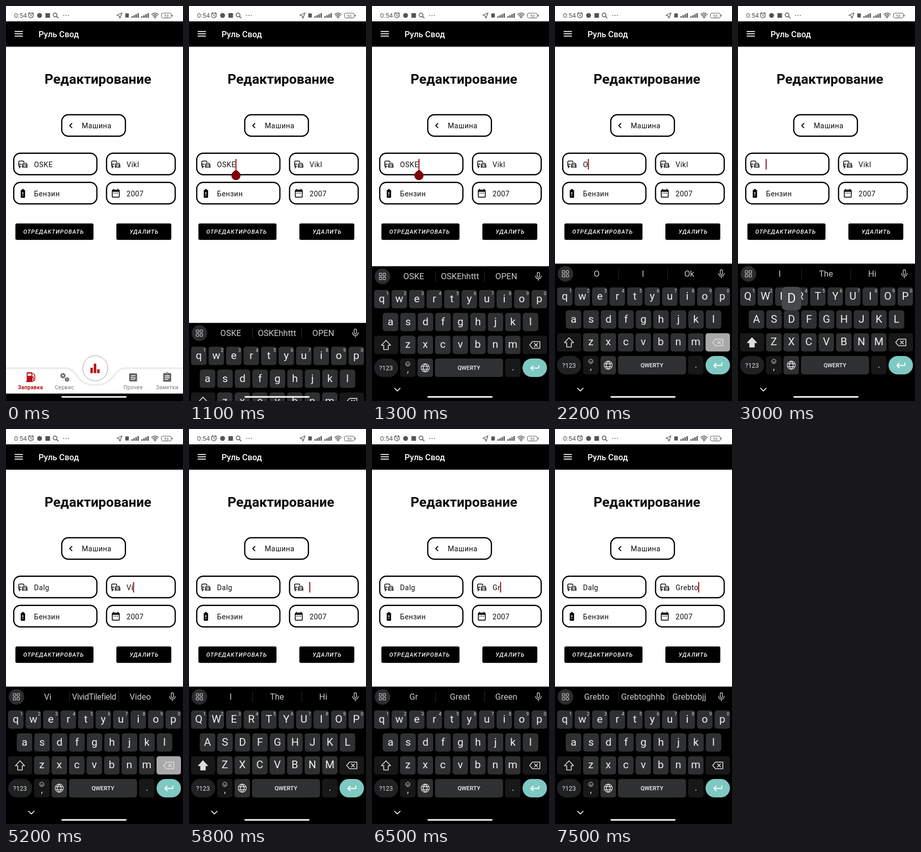
Write an HTML page that moves like this. It is 348 by 772 pixels and loops after 8000 ms.

```html
<!DOCTYPE html>
<html lang="ru">
<head>
<meta charset="utf-8">
<style>
html, body { margin: 0; height: 100%; overflow: hidden; background: #fff; }
svg { display: block; width: 100vw; height: 100vh; font-family: Roboto, "Noto Sans", sans-serif; }
.mid { text-anchor: middle; }
.line { fill: none; stroke: currentColor; stroke-width: 1.4; stroke-linecap: round; stroke-linejoin: round; }
.box { fill: #fff; stroke: #000; stroke-width: 2.4; }
.field { font-size: 14.2px; letter-spacing: .44px; fill: #111; }
.btn { font: italic 500 11px Roboto, "Noto Sans", sans-serif; letter-spacing: 1.1px; fill: #fff; }
.tab { font-size: 10.5px; letter-spacing: .3px; fill: #757575; text-anchor: middle; }
.letter { font-size: 21px; fill: #f0f0f0; text-anchor: middle; }
.digit { font-size: 9px; fill: #dcdcdc; text-anchor: middle; }
.hint { font-size: 16.5px; fill: #c9cbcd; text-anchor: middle; }
.caps .letter { text-transform: uppercase; }
.caps #shift { fill: #ddd; }
</style>
</head>
<body>
<svg id="stage" viewBox="0 0 348 772" preserveAspectRatio="none"></svg>
<script>
const rect = (x, y, w, h, r, fill, extra = '') =>
  `<rect x="${x}" y="${y}" width="${w}" height="${h}" rx="${r}" fill="${fill}" ${extra}/>`;
const text = (x, y, cls, label, extra = '') =>
  `<text x="${x}" y="${y}" class="${cls}" ${extra}>${label}</text>`;
const circle = (x, y, r, fill, extra = '') =>
  `<circle cx="${x}" cy="${y}" r="${r}" fill="${fill}" ${extra}/>`;
const line = (d, color, width = 1.4) =>
  `<path class="line" d="${d}" style="color:${color};stroke-width:${width}"/>`;
const at = (x, y, scale, body) => `<g transform="translate(${x} ${y}) scale(${scale})">${body}</g>`;
const frame = (x, y, w) => `<rect class="box" x="${x}" y="${y}" width="${w}" height="42" rx="13"/>`;

// Icons on a 24-unit grid
const commute =
  line('M7.5 17H5Q3 17 3 15V7Q3 5 5 5H12Q14 5 14 7V7.5M3 12H8.5M5 18L4 20', '#111', 1.8) +
  line('M11 19V14L12.5 10H19.5L21 14V19M11 13.5H21M11 18H21', '#111', 1.6) +
  circle(5.2, 14.8, 1, '#111') + circle(13, 15.8, 1, '#111') + circle(19, 15.8, 1, '#111');
const battery = rect(7, 4, 10, 18, 1.4, '#000') + rect(10, 2, 4, 3, 0, '#000') +
  rect(11, 9, 2, 5, 0, '#fff') + rect(11, 16, 2, 2, 0, '#fff');
const calendar = rect(3, 4, 18, 18, 2, '#111') + rect(5, 9, 14, 11, 0, '#fff') +
  rect(6, 2, 2, 3, 0, '#111') + rect(16, 2, 2, 3, 0, '#111') +
  [7, 11, 15].map(x => rect(x, 11, 2, 2, 0, '#111')).join('');
const pump = rect(4, 2, 12, 20, 1.5, '#b80f14') + rect(6, 4.5, 8, 5, .5, '#fff') +
  rect(2.5, 20.5, 15, 2, 0, '#b80f14') +
  line('M16 12H18V18Q18 19.5 19.5 19.5T21 18V8L17.5 4.5', '#b80f14', 1.7);
const gear = (x, y, r) => circle(x, y, r, 'none', 'stroke="#666" stroke-width="2.6"') +
  circle(x, y, r + 1.6, 'none',
    `stroke="#666" stroke-width="2" pathLength="16" stroke-dasharray="1 1"`);
const note = rect(3, 3, 18, 18, 2, '#616161') + line('M8 8H17M7 12H14M7 16H11M17 13L13 17', '#fff', 1.8);
const clipboard = rect(3, 3, 18, 19, 2, '#616161') + circle(12, 3.5, 2.6, '#616161') +
  circle(12, 4, 1, '#fff') + line('M7 9H17M7 13H17M7 17H14', '#fff', 1.9);

function statusBar() {
  const ink = '#555';
  const bars = x => [3, 5, 7, 9].map((h, i) => rect(x + i * 4, 23 - h, 2.7, h, .5, ink)).join('');
  return text(16, 23, '', '0:54', `font-size="13" fill="${ink}"`) +
    circle(49, 18.5, 4.6, 'none', `stroke="${ink}" stroke-width="1.4"`) +
    line('M49 16V19L51 20M44 15L46.5 12.8M54 15L51.5 12.8', ink, 1.3) +
    circle(66, 18.5, 4.8, ink) + rect(77.5, 14, 9, 9, 0, ink) +
    circle(96.5, 17.5, 3.7, 'none', `stroke="${ink}" stroke-width="1.5"`) +
    line('M99.5 20.5L102.5 23.5', ink, 1.7) +
    [113.5, 118, 122.5].map(x => circle(x, 18.5, 1, ink)).join('') +
    line('M218 18L228 13.5L224 24L222.5 19.5Z', ink, 1.3) +
    rect(234.5, 14.5, 7, 8, 0, ink) + bars(246.5) + bars(266) +
    line('M286.5 16.5Q293 11 299.5 16.5M288.5 19Q293 15.2 297.5 19M290.7 21.2Q293 19.4 295.3 21.2', ink, 1.5) +
    circle(293, 23, 1.2, ink) +
    rect(305.5, 14, 19.5, 9.5, 3, 'none', `stroke="${ink}"`) + rect(326, 17, 1.5, 3.5, .7, ink) +
    text(315.3, 21.6, 'mid', '53', `font-size="8" fill="${ink}"`);
}

function page() {
  return rect(0, 0, 348, 772, 0, '#fff') + statusBar() +
    rect(0, 79, 348, 3, 0, '#f1f1f1') + rect(0, 30, 348, 49.5, 0, '#000') +
    [49.8, 54.3, 58.8].map(y => rect(17, y - .9, 16.2, 1.8, 0, '#fff')).join('') +
    text(64, 61, '', 'Руль Свод', 'font-size="16.3" font-weight="500" fill="#fff"') +
    text(180.7, 152, 'mid', 'Редактирование', 'font-size="26.6" font-weight="700" fill="#0a0a0a"') +
    frame(109.6, 212.5, 125.2) + line('M129.5 229.5L125.3 233.7L129.5 237.9', '#111', 2) +
    text(149, 239.3, 'field', 'Машина') +
    frame(15.2, 287.7, 163.5) + frame(197.7, 287.7, 135) +
    frame(15.2, 344.7, 163.5) + frame(197.7, 344.7, 135) +
    at(22.5, 298.5, .9, commute) + at(205, 298.5, .9, commute) +
    at(23, 356, .85, battery) + at(205.5, 355.5, .86, calendar) +
    text(55, 314.8, 'field', '', 'id="make"') + text(237, 314.8, 'field', '', 'id="model"') +
    text(55, 371.5, 'field', 'Бензин') + text(237, 371.5, 'field', '2007') +
    rect(18.5, 425.7, 153.5, 32.3, 3, '#ddd') + rect(217, 425.7, 108, 32.3, 3, '#ddd') +
    rect(18.5, 425, 153.5, 32, 3, '#000') + rect(217, 425, 108, 32, 3, '#000') +
    text(34, 445, 'btn', 'ОТРЕДАКТИРОВАТЬ') + text(243, 445, 'btn', 'УДАЛИТЬ') +
    `<g id="cursor">${rect(-1, 299, 2, 20.5, 0, '#8e0a10')}
      <path id="handle" fill="#7d0207" d="M0 319.5L6.4 325A9 9 0 1 1 -6.4 325Z"/></g>`;
}

function tabs() {
  return line('M0 708H118C140 708 137 741 175.5 741S211 708 233 708H348', '#ececec', 3.5) +
    circle(175.5, 708.5, 25.3, '#eee') +
    circle(175.5, 708, 24.6, '#fff', 'stroke="#a98488" stroke-width=".8"') +
    rect(166, 707, 4.8, 10.5, 0, '#b80f14') + rect(172.6, 699, 4.8, 18.5, 0, '#b80f14') +
    rect(179.2, 710, 4.8, 7.5, 0, '#b80f14') +
    at(37, 714, .93, pump) + gear(112, 722.5, 3) + gear(120, 730, 2.2) +
    at(239.5, 715.5, .87, note) + at(306.5, 715, .87, clipboard) +
    text(48, 748.5, 'tab', 'Заправка', 'style="fill:#b80f14;font-weight:700"') +
    text(115, 748.5, 'tab', 'Сервис') + text(250, 748.5, 'tab', 'Прочее') +
    text(317, 748.5, 'tab', 'Заметки') + rect(0, 757.5, 348, 15, 0, '#000');
}

const rows = [['qwertyuiop', 19.3, 550], ['asdfghjkl', 36.4, 594.7], ['zxcvbnm', 70.4, 639.4]];
const keys = {};
rows.forEach(([letters, x, y]) => [...letters].forEach((c, i) => keys[c] = [x + i * 34.4, y]));

function keyboard() {
  const dark = '#181819', mid = '#2f3032', ink = '#dedede';
  const letters = Object.entries(keys).map(([c, [x, y]], i) =>
    rect(x - 15.2, y, 30.4, 35.8, 5, mid) + text(x, y + 24, 'letter', c) +
    (i < 10 ? text(x + 11.3, y + 10, 'digit', (i + 1) % 10) : '')).join('');
  const grid = [[15, 518], [22.5, 518], [15, 525.5], [22.5, 525.5]].map(([x, y]) =>
    rect(x - .8, y - .8, 5, 5, 1, 'none', 'stroke="#bbb" stroke-width="1.3"')).join('');
  return rect(0, 503.5, 348, 270, 0, '#000') + circle(20.5, 523.5, 15.3, '#2b2c2e') + grid +
    rect(124.5, 513, 1, 21, 0, '#2c2c2c') + rect(221, 513, 1, 21, 0, '#2c2c2c') +
    [82, 173, 264].map(x => text(x, 529, 'hint', '')).join('') +
    rect(324.8, 515.5, 4.6, 9.5, 2.3, 'none', 'stroke="#bbb" stroke-width="1.5"') +
    line('M321.5 522.5Q322 528 327.1 528T332.7 522.5M327.1 528V531.5', '#bbb', 1.5) +
    letters + rect(4, 639.4, 47.5, 35.8, 5, dark) +
    `<path id="shift" class="line" style="color:${ink};stroke-width:1.6"
      d="M27.5 648.5L36.5 658H32V666.5H23V658H18.5Z"/>` +
    rect(296, 639.4, 48, 35.8, 5, dark, 'id="erase"') +
    line('M310 657.5L315.5 651H330V664H315.5ZM319.3 654.5L325.5 660.5M325.5 654.5L319.3 660.5', ink, 1.6) +
    rect(4, 684, 47.5, 36, 18, '#202122') +
    text(27.5, 706.5, 'mid', '?123', `font-size="12.5" fill="${ink}"`) +
    rect(55.2, 684, 30.4, 36, 5, dark) + circle(70.4, 694.5, 4.3, 'none', `stroke="${ink}"`) +
    circle(68.9, 693.6, .7, ink) + circle(71.9, 693.6, .7, ink) + line('M68.2 695.8Q70.4 698 72.6 695.8', ink, 1) +
    text(70.4, 711, 'mid', ',', `font-size="18" fill="${ink}"`) +
    rect(89.5, 684, 30.4, 36, 5, mid) +
    line('M96.7 702a8 8 0 1 0 16 0a8 8 0 1 0 -16 0M97.5 699H112M97.5 705H112M104.7 694Q97 702 104.7 710Q112.4 702 104.7 694', ink, 1.3) +
    rect(123.8, 684, 133.8, 36, 5, mid) +
    text(190.5, 706, 'mid', 'QWERTY', 'font-size="11.3" font-weight="500" fill="#f4f4f4"') +
    rect(261.6, 684, 30.4, 36, 5, dark) + text(277, 707, 'mid', '.', `font-size="18" fill="${ink}"`) +
    rect(296, 684, 48, 36, 18, '#7ec9c2') +
    line('M328 697.5V702.5H312.5M316.8 698L312.3 702.5L316.8 707', '#fff', 1.8) +
    `<g id="popup">${rect(-19, -46, 38, 46, 8, '#47484b')}
      <text class="letter" y="-15" style="font-size:26px"></text></g>`;
}

const stage = document.getElementById('stage');
stage.innerHTML = page() + tabs() + `<g id="keyboard">${keyboard()}</g>` +
  `<g id="chevron">${line('M44.3 747L49.8 752.3L55.3 747', '#fff', 1.7)}</g>` +
  rect(109, 762.6, 128, 2.9, 1.4, '#fff');
const $ = id => document.getElementById(id);
const hints = [...stage.querySelectorAll('#keyboard .hint')];
const popupText = $('popup').querySelector('text');

// [time, make, model, suggestions]
const steps = [
  [0, 'OSKE', 'Vikl', 'OSKE OSKEhhttt OPEN'],
  [1700, 'OSK', 'Vikl', 'OSK Ask Ok'],
  [1900, 'OS', 'Vikl', 'OS Is So'],
  [2100, 'O', 'Vikl', 'O I Ok'],
  [2300, '', 'Vikl', 'I The Hi'],
  [3100, 'D', 'Vikl', 'D Do Did'],
  [3300, 'Da', 'Vikl', 'Da Day Days'],
  [3600, 'Dal', 'Vikl', 'Dal Dale DALvg'],
  [3800, 'Dalg', 'Vikl', 'Dalg DALGvggg DALGcff'],
  [4700, 'Dalg', 'Vikl', 'Vikl Viklbhh Video'],
  [4900, 'Dalg', 'Vik', 'Vik Viking Video'],
  [5100, 'Dalg', 'Vi', 'Vi VividTilefield Video'],
  [5400, 'Dalg', 'V', 'V Very Vs'],
  [5600, 'Dalg', '', 'I The Hi'],
  [6100, 'Dalg', 'G', 'G Good Go'],
  [6500, 'Dalg', 'Gr', 'Gr Great Green'],
  [6700, 'Dalg', 'Gre', 'Gre Great Green'],
  [6900, 'Dalg', 'Greb', 'Greb Grebe Grey'],
  [7400, 'Dalg', 'Grebt', 'Grebt Grebtgh Grebtvb'],
  [7500, 'Dalg', 'Grebto', 'Grebto Grebtoghhb Grebtobjj']
];
// [time, key], each held for a tenth of a second
const presses = [[3000, 'd'], [3200, 'a'], [3500, 'l'], [3700, 'g'],
  [6000, 'g'], [6300, 'r'], [6600, 'e'], [6800, 'b'], [7300, 't']];

const show = (id, on) => $(id).style.display = on ? '' : 'none';
const within = (t, a, b) => t >= a && t < b;

function setHint(el, label) {
  el.textContent = label;
  el.style.letterSpacing = '0px';
  const extra = el.getComputedTextLength() - 86;
  if (extra > 0) el.style.letterSpacing = -extra / label.length + 'px';
}

function draw(t) {
  const [, make, model, words] = steps.findLast(s => s[0] <= t);
  $('make').textContent = make;
  $('model').textContent = model;
  words.split(' ').forEach((w, i) => setHint(hints[i], w));

  const second = t >= 4600;
  const width = $(second ? 'model' : 'make').getComputedTextLength();
  $('cursor').setAttribute('transform', `translate(${(second ? 237 : 55) + width + .4} 0)`);
  show('cursor', t >= 900 && !within(t, 4300, 4600));
  show('handle', within(t, 1000, 1700) || within(t, 4600, 4900));

  const left = 1 - Math.min(1, Math.max(0, (t - 1000) / 400));
  $('keyboard').setAttribute('transform', `translate(0 ${263 * left ** 2.85})`);
  show('keyboard', t > 1000);
  show('chevron', t > 1100);

  const caps = within(t, 2600, 3100) || within(t, 5800, 6100);
  $('keyboard').classList.toggle('caps', caps);
  const erasing = within(t, 1700, 2400) || within(t, 4900, 5700);
  $('erase').setAttribute('fill', erasing ? '#a9a9a9' : '#181819');

  const press = presses.find(p => within(t, p[0], p[0] + 100));
  show('popup', press);
  if (press) {
    popupText.textContent = press[1];
    $('popup').setAttribute('transform', `translate(${keys[press[1]].join(' ')})`);
  }
}

const start = performance.now();
let last = -1;
function tick() {
  const t = Math.floor((performance.now() - start) % 8000 / 100) * 100;
  if (t !== last) draw(last = t);
  requestAnimationFrame(tick);
}
tick();
</script>
</body>
</html>
```
